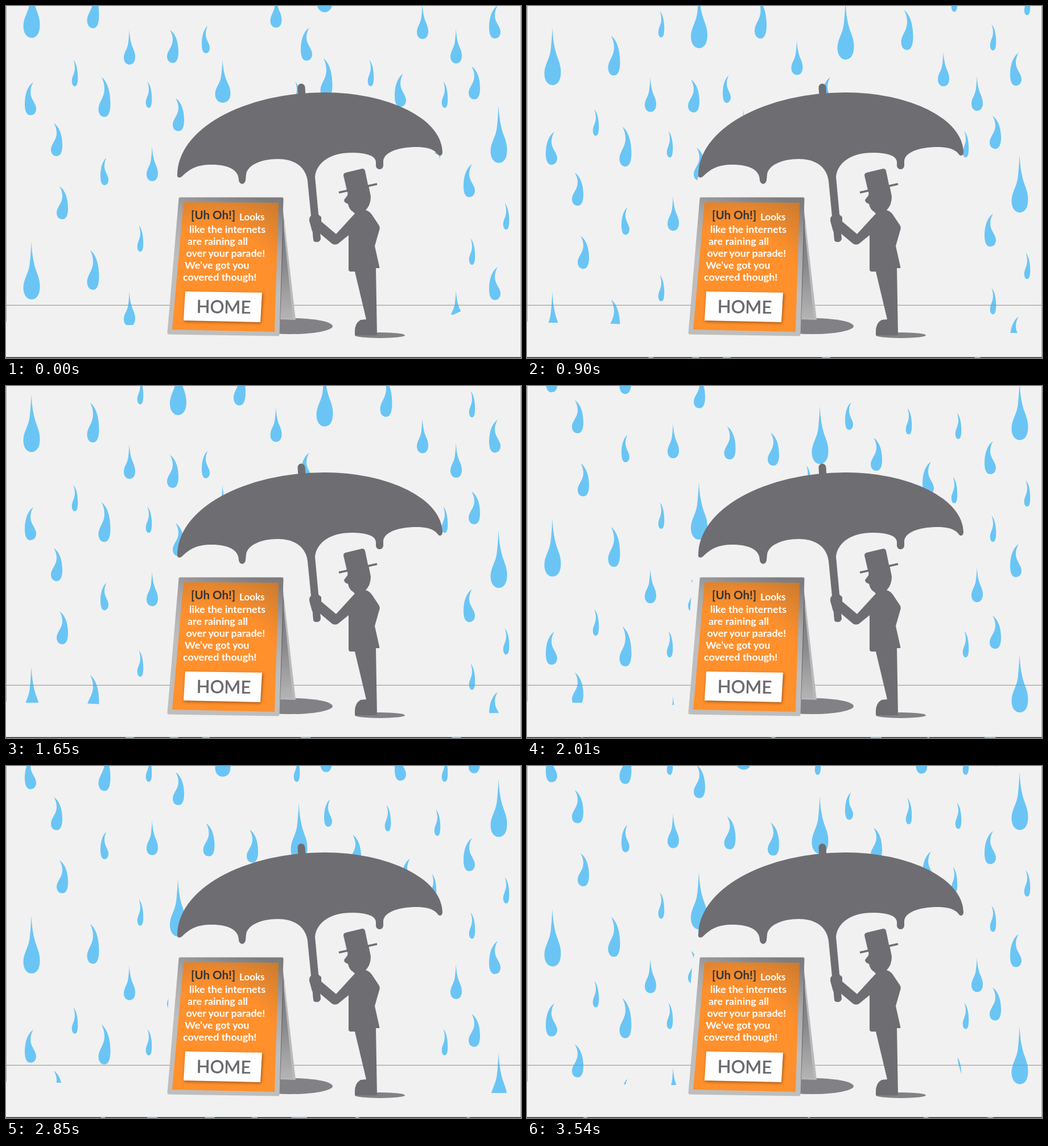
Animation, 905 px wide and 619 px high, one loop 3570 ms. Source, as an HTML page:

```html
<!DOCTYPE html>
<html lang="en">
<head>
<meta charset="utf-8">
<title>Rain</title>
<style>
html, body { margin: 0; width: 100%; height: 100%; overflow: hidden; background: #f1f1f1; }
svg { display: block; width: 905px; height: 619px; }
text { font-family: Lato, sans-serif; font-weight: 700; fill: #fff; }
</style>
</head>
<body>
<svg viewBox="0 0 905 619">
  <defs>
    <path id="curved" d="M5 0C14 6 20 20 20 40C20 52 17 60 10 60C3 60 0 54 0 48C0 38 10 31 10 18C10 11 8 5 5 0Z"/>
    <path id="straight" d="M9.7 0C10.3 12 12 21 15 29C18 36 20 40 20 47C20 55 16 60 10 60C4 60 0 55 0 48C0 39 6 34 7.6 24C8.6 17 9.3 8 9.7 0Z"/>
    <g id="sheet" fill="#6ac5f5"></g>
    <linearGradient id="frame" x1=".8" y1="0" x2=".5" y2="1">
      <stop stop-color="#7d7d80"/><stop offset=".3" stop-color="#a9a9ab"/><stop offset=".6" stop-color="#bebebe"/>
    </linearGradient>
    <radialGradient id="orange" gradientUnits="userSpaceOnUse" cx="355" cy="520" r="215">
      <stop offset=".6" stop-color="#ff902c"/><stop offset="1" stop-color="#c97a30"/>
    </radialGradient>
    <linearGradient id="leg" x1="0" y1="0" x2="0" y2="1">
      <stop stop-color="#747477"/><stop offset=".5" stop-color="#8b8b8e"/><stop offset="1" stop-color="#b4b4b4"/>
    </linearGradient>
    <filter id="soft" x="-10%" y="-20%" width="120%" height="150%"><feGaussianBlur stdDeviation="2.5"/></filter>
  </defs>

  <rect width="905" height="619" fill="#f1f1f1"/>
  <rect y="617.5" width="905" height="1.5" fill="#2e2e30"/>
  <g id="rain"></g>

  <!-- dry ground and the shelter under the umbrella -->
  <path fill="#f1f1f1" d="M0 557H110L200 561H284V440L286 400L291 345L303 290L420 240H700L761 262L764 280V490L756 505L757 520L763 541L786 543L799 537L840 556L848 575H905V617H0Z"/>
  <path d="M0 526.2H905" stroke="#8b8b8d"/>
  <path d="M.5 0V555M904.5 0V617" stroke="#a8a8aa"/>

  <g fill="#828186">
    <ellipse cx="500" cy="563" rx="74" ry="14"/>
    <ellipse cx="657" cy="579" rx="44" ry="5"/>
  </g>

  <g fill="#6e6d72" stroke-linecap="round" stroke-linejoin="round">
    <path d="M519 143L520 160" stroke="#6e6d72" stroke-width="13"/>
    <path d="M301 297A259 145 0 0 1 560 152A207 106 0 0 1 767 257C767 263 762 265 759 261C752 251 738 248 722 248C692 248 665 256 663 272V281C662 289 651 289 650 281V274C649 263 633 258 607 258C570 258 546 275 543 300L553 409C553 415 541 417 540 410L530 308C527 284 508 269 478 269C446 269 424 281 422 296L421 306C420 315 410 315 409 306C409 288 390 279 362 279C334 279 323 287 311 298C307 303 300 303 301 297Z"/>
    <path d="M533 378Q532 369 539 368L548 366L554 371V386L549 398L538 396Z"/>
    <path d="M539 392L550 390L552 410Q552 415 546 415T540 411Z"/>
    <path d="M593 298Q593 294 597 293L626 286Q630 286 631 290L637 319L600 328Z"/>
    <path d="M585 328L652 313" stroke="#6e6d72" stroke-width="3.5" stroke-linecap="butt"/>
    <path d="M601 325L600 333L594 341Q594 346 601 348Q603 358 610 362L613 365L580 401L554 379L548 397L573 418Q580 422 586 416L602 403V463Q602 467 606 467H613L633 551L623 552Q613 558 613 572V579H652L650 461H655Q657 461 656 458L648 422L656 394Q658 389 655 385L643 367Q639 361 632 359Q641 350 641 335L637 315Z"/>
  </g>

  <path d="M486 350L509 552L482 551Z" fill="#bababc"/>
  <path d="M486 372L504 549H482Z" fill="url(#leg)"/>
  <path d="M485 345L488 380L482 550H480Z" fill="#67676b"/>
  <path d="M306 339H485L478 578L286 575Z" fill="url(#frame)" stroke="url(#frame)" stroke-width="5" stroke-linejoin="round"/>
  <path d="M312 345L479 346L472 573L292 569Z" fill="url(#orange)"/>

  <g font-size="17.9">
    <text x="325" y="375" font-size="20.5" style="fill:#333">[Uh Oh!]</text>
    <text x="410" y="377" font-size="17">Looks</text>
    <text x="322" y="399">like the internets</text>
    <text x="319" y="420">are raining all</text>
    <text x="316.500" y="441">over your parade!</text>
    <text x="314" y="462">We’ve got you</text>
    <text x="311" y="483">covered though!</text>
  </g>
  <path d="M316 504L452 506L448 558L313 555Z" fill="#64360c" opacity=".6" filter="url(#soft)"/>
  <path d="M315 502L450 504L447 556L312 553Z" fill="#fff"/>
  <text x="335" y="540" font-size="31" style="fill:#6b6a6f;font-weight:400" stroke="#6b6a6f" stroke-width=".7" transform="rotate(.8 380 530)">HOME</text>
</svg>

<script>
const LOOP = 3570, STEP = 30;
const sheet = document.getElementById('sheet');
const rain = document.getElementById('rain');

// a negative width leans the drop the other way
const kinds = {
  s: ['curved', 10.5, 46],
  c: ['curved', 20, 58],
  l: ['curved', 21, 70],
  m: ['curved', -14, 48],
  f: ['curved', -20, 58],
  d: ['straight', 20, 61],
  t: ['straight', 27, 75],
  b: ['straight', 29, 102]
};

// evenly spaced drops, one per letter, cycling through the heights
function row(letters, x, gap, ...heights) {
  [...letters].forEach((letter, i) => {
    const [shape, w, h] = kinds[letter];
    const left = x + i * gap - w / 2, top = heights[i % heights.length];
    sheet.innerHTML += `<use href="#${shape}" transform="translate(${left} ${top}) scale(${w / 20} ${h / 60})"/>`;
  });
}

// the same cluster three times across
[0, -65, -45].forEach((dy, i) => {
  const x = i * 257.5;
  row('bcl', x + 45, 54, 242 + dy, 145 + dy, 257 + dy);
  row('ds', x + 217, 19, 330 + dy, 214 + dy);
});
// long rows, then what fills the gaps
row('sstsss', 121, 130, -77, -39);
row('flcclfc', 43, 130, -38, -47, -10, 91, -80, -53, -66);
row('cmd', 89, 84, 34, 95, 75);
row('bm', 515, 51, 44, 38);
row('ss', 671, 87, 48, 56);
row('cm', 293, 58, -130, -137);
row('ff', 705, 109, 142, 106);
row('ss', 819, 60, 237, 175);
row('df', 791, 68, 328, 287);
row('f', 528, 0, -134);
row('b', 866, 0, 2);

// sheets of drops follow one another down the stage, slightly unevenly spaced
const starts = [172, -288, -752, -1231, -1712, -2159];
rain.innerHTML = '<use href="#sheet"/>'.repeat(starts.length);

// steady fall that quickens a little near the end
const fallen = t => 0.608 * t + 0.022 * Math.max(0, t - 2850);

const begin = performance.now();
function draw() {
  const t = Math.floor((performance.now() - begin) % LOOP / STEP) * STEP;
  starts.forEach((y, i) => rain.children[i].setAttribute('transform', `translate(0 ${y + fallen(t)})`));
  requestAnimationFrame(draw);
}
draw();
</script>
</body>
</html>
```
